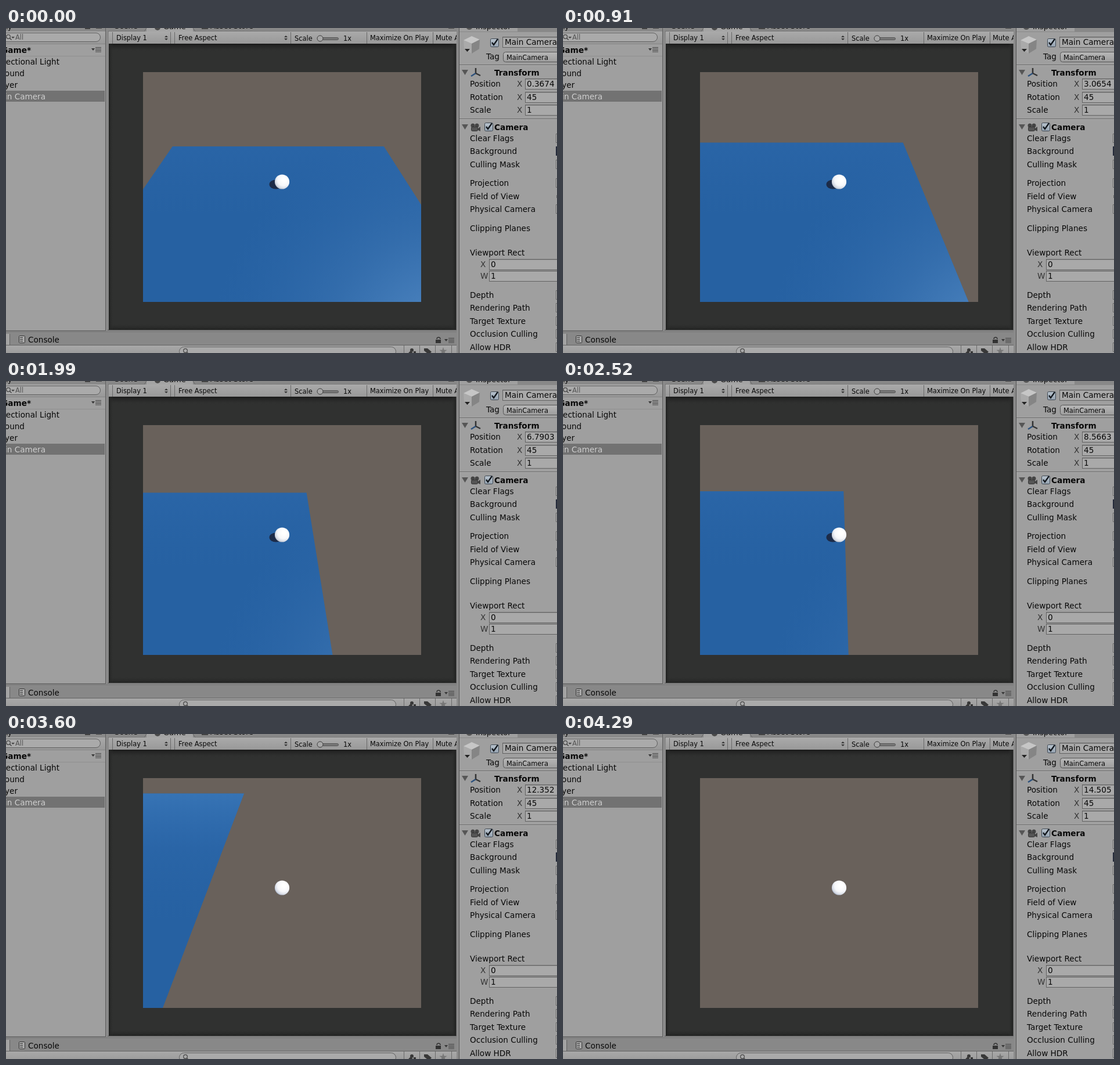
These frames come from a looping animation (949 px wide and 560 px high, 4.37 s). An HTML page with a canvas:

```html
<!DOCTYPE html>
<html lang="en">
<head>
<meta charset="utf-8">
<title>Rolling ball in the editor</title>
<style>
html, body { margin: 0; width: 100%; height: 100%; overflow: hidden; background: #9f9f9f; }
canvas { display: block; }
</style>
</head>
<body>
<canvas id="stage" width="949" height="560"></canvas>
<script>
const g = document.getElementById('stage').getContext('2d');
const LOOP = 4370, FPS = 13;
const FONT = '"DejaVu Sans", sans-serif';
const VIEW = { x: 236, y: 76, w: 479, h: 396 };
const MID = 475.5, HORIZON = -70;

// [step, value] pairs
const CAMERA_X = [[0, .367], [12, 3.8], [20, 5.9], [33, 9.55], [40, 11.37], [47, 13.24], [56, 15.6]];
const LABEL_X = [[0, .3674], [12, 3.0654], [20, 5.2681], [33, 8.5663], [40, 10.721], [47, 12.352], [56, 14.505]];
const FAR_Z = [[0, 1.511], [12, 1.572], [20, 1.601], [33, 1.646], [56, 1.726]];

function lerpKeys(keys, n) {
  let i = 1;
  while (i < keys.length - 1 && keys[i][0] < n) i++;
  const [a, va] = keys[i - 1], [b, vb] = keys[i];
  return va + (vb - va) * (n - a) / (b - a);
}

function box(x, y, w, h, fill) {
  g.fillStyle = fill;
  g.fillRect(x, y, w, h);
}

function grad(y0, y1, ...stops) {
  const s = g.createLinearGradient(0, y0, 0, y1);
  stops.forEach((c, i) => s.addColorStop(i / (stops.length - 1), c));
  return s;
}

function text(str, x, y, size = 13.6, { align = 'left', bold = false, color = '#080808' } = {}) {
  g.font = (bold ? 'bold ' : '') + size + 'px ' + FONT;
  g.textAlign = align;
  g.fillStyle = color;
  g.fillText(str, x, y);
}

function poly(points, fill) {
  g.beginPath();
  for (const [x, y] of points) g.lineTo(x, y);
  g.closePath();
  g.fillStyle = fill;
  g.fill();
}

function ellipse(x, y, rx, ry, fill) {
  g.beginPath();
  g.ellipse(x, y, rx, ry, 0, 0, 7);
  g.fillStyle = fill;
  g.fill();
}

function pill(x, y, w, h, r, fill, line) {
  g.beginPath();
  g.roundRect(x + .5, y + .5, w - 1, h - 1, r);
  g.fillStyle = fill;
  g.fill();
  g.strokeStyle = line;
  g.lineWidth = 1;
  g.stroke();
}

function stroke(points, color, width = 1) {
  g.beginPath();
  for (const [x, y] of points) g.lineTo(x, y);
  g.strokeStyle = color;
  g.lineWidth = width;
  g.stroke();
}

function lens(x, y) {
  g.beginPath();
  g.arc(x, y, 3.3, 0, 7);
  g.strokeStyle = '#444';
  g.lineWidth = 1.2;
  g.stroke();
  stroke([[x + 2.4, y + 2.4], [x + 5.5, y + 5.5]], '#444', 1.4);
}

function menuIcon(x, y) {
  poly([[x, y - 2], [x + 6, y - 2], [x + 3, y + 2]], '#383838');
  for (let i = 0; i < 4; i++) box(x + 7, y - 4 + i * 2.5, 10, 1, '#444');
}

function upDown(x, y) {
  poly([[x - 3, y - 1], [x + 3, y - 1], [x, y - 4]], '#333');
  poly([[x - 3, y + 1], [x + 3, y + 1], [x, y + 4]], '#333');
}

function field(x, y, value) {
  box(x, y, 949 - x, 19, '#626262');
  box(x + 1, y + 1, 948 - x, 17, '#a9a9a9');
  box(x + 1, y + 1, 948 - x, 1, '#8e8e8e');
  text(value, x + 3, y + 14);
}

function check(x, y) {
  pill(x, y, 15, 15, 2, grad(y, y + 15, '#b9c4ce', '#93a1af'), '#3d4650');
  stroke([[x + 3, y + 7], [x + 6, y + 11], [x + 13, y + 1]], '#10151b', 2.3);
}

function foldout(x, y) {
  poly([[x, y], [x + 11, y], [x + 5.5, y + 9]], '#565656');
}

function leftPanel() {
  box(0, 0, 172, 521, '#9f9f9f');
  box(0, 0, 172, 6, '#8a8a8a');
  box(0, 6, 172, 21, grad(6, 27, '#a9a9a9', '#989898'));
  box(0, 27, 172, 1, '#858585');
  text('Hierarchy', 10, 2, 11.4, { align: 'right' });
  box(136, 0, 9, 2, '#444');
  box(155, 0, 10, 1, '#444');
  pill(-14, 8, 177, 16, 8, '#aaaaaa', '#5f5f5f');
  lens(4, 15);
  poly([[9, 15], [15, 15], [12, 18]], '#444');
  text('All', 16, 20, 11.4, { color: '#555' });
  text('Game*', 43, 43, 13.6, { align: 'right', bold: true });
  menuIcon(147, 37);
  box(0, 48, 171, 1, '#8f8f8f');
  box(0, 108, 170, 19, '#727272');
  text('Directional Light', 92, 63, 13.6, { align: 'right' });
  text('Ground', 32, 83, 13.6, { align: 'right' });
  text('Player', 20, 103, 13.6, { align: 'right' });
  text('Main Camera', 68, 123, 13.6, { align: 'right', color: '#cfcfcf' });
  box(171, 0, 1, 522, '#5e5e5e');
  box(172, 0, 5, 524, '#8a8a8a');
  box(0, 521, 172, 1, '#5e5e5e');
}

function gamePanel() {
  g.save();
  g.beginPath();
  g.rect(176, 0, 600, 524);
  g.clip();
  box(176, 0, 600, 524, '#888');
  box(242, 0, 80, 6, '#a4a4a4');
  stroke([[242, 0], [238, 6], [176, 6]], '#666');
  stroke([[322, 0], [326, 6], [776, 6]], '#666');
  text('Scene', 187, 1, 13);
  ellipse(261, -1, 5, 5, '#4a4a4a');
  text('Game', 271, 2, 13);
  box(337, 0, 11, 2, '#444');
  text('Asset Store', 352, 1, 13);
  box(762, 0, 10, 1, '#444');
  box(177, 6, 599, 22, grad(6, 28, '#aaa', '#989898'));
  for (const x of [183, 283, 290, 490, 621, 735]) box(x, 7, 1, 20, '#686868');
  text('Display 1', 190, 21, 11.4);
  upDown(276, 17);
  text('Free Aspect', 297, 21, 11.4);
  upDown(482, 17);
  text('Scale', 497, 22, 11.4);
  pill(538, 16, 35, 5, 2, '#777', '#555');
  g.beginPath();
  g.arc(541, 18, 5, 0, 7);
  g.fillStyle = '#a8a8a8';
  g.fill();
  g.strokeStyle = '#3c3c3c';
  g.stroke();
  text('1x', 581, 22, 11.4);
  text('Maximize On Play', 627, 21, 11.4);
  text('Mute Audio', 740, 21, 11.4);
  g.restore();

  box(177, 27, 599, 493, '#303130');
  box(177, 27, 599, 14, grad(27, 41, '#1a1a1a', 'rgba(48,49,48,0)'));
  box(177, 508, 599, 12, grad(508, 520, 'rgba(48,49,48,0)', '#222322'));
  for (const [x, d] of [[177, 1], [775, -1]]) {
    const s = g.createLinearGradient(x, 0, x + d * 8, 0);
    s.addColorStop(0, '#1f201f');
    s.addColorStop(1, 'rgba(48,49,48,0)');
    box(d > 0 ? x : x - 8, 27, 8, 493, s);
  }
  box(175, 520, 602, 1, '#5c5c5c');
  box(775, 27, 1, 493, '#555');
}

function consolePanel() {
  box(0, 522, 780, 38, '#888');
  box(0, 523, 778, 1, '#777');
  box(0, 527, 6, 20, '#a3a3a3');
  box(6, 527, 1, 19, '#5f5f5f');
  box(0, 546, 778, 1, '#636363');
  box(0, 547, 778, 13, grad(547, 566, '#a8a8a8', '#999'));
  pill(22, 530, 11, 13, 1, '#aaa', '#333');
  for (let y = 533; y < 541; y += 3) box(24, y, 5, 1, '#333');
  text('Console', 38, 542);
  box(740, 537, 9, 6, '#333');
  g.beginPath();
  g.arc(745, 536, 3, Math.PI, 0);
  g.strokeStyle = '#333';
  g.lineWidth = 1.5;
  g.stroke();
  menuIcon(755, 538);
  pill(298, 549, 374, 17, 8, '#aaa', '#5f5f5f');
  lens(309, 556);
  for (const x of [685, 712, 739, 767]) box(x, 547, 1, 13, '#6a6a6a');
  ellipse(699, 555, 3, 3, '#383838');
  poly([[693, 560], [697, 556], [701, 560]], '#383838');
  box(702, 557, 4, 3, '#383838');
  poly([[720, 552], [726, 552], [733, 558], [731, 560], [725, 560], [720, 556]], '#383838');
  const star = [];
  for (let i = 0; i < 10; i++) {
    const r = i % 2 ? 2.7 : 7, a = i * Math.PI / 5 - Math.PI / 2;
    star.push([753 + r * Math.cos(a), 557 + r * Math.sin(a)]);
  }
  poly(star, '#777');
}

function inspector(label) {
  box(776, 0, 5, 560, '#8a8a8a');
  box(780, 0, 169, 560, '#9f9f9f');
  box(780, 0, 1, 560, '#515151');
  box(881, 0, 68, 6, '#888');
  text('Inspector', 809, 2, 13);
  ellipse(798, -1, 5, 4, '#555');
  box(781, 6, 168, 1, '#8a8a8a');
  poly([[788, 21], [802, 14], [816, 20], [802, 27]], '#c6c6c6');
  poly([[788, 21], [802, 27], [802, 44], [789, 36]], '#aaa');
  poly([[816, 20], [802, 27], [802, 44], [815, 36]], '#858585');
  poly([[790, 36], [799, 36], [794.5, 41]], '#222');
  check(834, 18);
  field(855, 15, '');
  text('Main Camera', 859, 29);
  text('Tag', 850, 54, 13.6, { align: 'right' });
  pill(856, 41, 110, 18, 4, grad(41, 59, '#b7b7b7', '#9d9d9d'), '#555');
  text('MainCamera', 862, 55, 11.4);
  box(781, 63, 168, 1, '#686868');
  box(781, 64, 168, 1, '#b0b0b0');

  foldout(785, 72);
  stroke([[809, 78], [809, 69]], '#333', 2.5);
  stroke([[809, 78], [801, 83]], '#2d527d', 2.5);
  stroke([[809, 78], [817, 82]], '#333', 2.5);
  text('Transform', 841, 82, 13.6, { bold: true });
  const rows = [['Position', label], ['Rotation', '45'], ['Scale', '1']];
  rows.forEach(([name, value], i) => {
    const y = 101 + Math.round(i * 22.5);
    text(name, 799, y);
    text('X', 880, y, 13.6, { color: '#333' });
    field(894, y - 14, value);
  });
  box(781, 156, 168, 1, '#686868');
  box(781, 157, 168, 1, '#b0b0b0');

  foldout(785, 166);
  ellipse(804, 168, 3.5, 3.5, '#444');
  ellipse(811, 168, 3.5, 3.5, '#444');
  pill(801, 170, 12, 8, 2, '#555', '#333');
  poly([[813, 173], [817, 170], [817, 178], [813, 176]], '#444');
  check(824, 163);
  text('Camera', 841, 176, 13.6, { bold: true });
  const labels = [
    ['Clear Flags', 195], ['Background', 217], ['Culling Mask', 240], ['Projection', 272],
    ['Field of View', 295], ['Physical Camera', 317], ['Clipping Planes', 350], ['Viewport Rect', 392],
    ['Depth', 465], ['Rendering Path', 487], ['Target Texture', 510], ['Occlusion Culling', 532], ['Allow HDR', 555]
  ];
  for (const [name, y] of labels) text(name, 799, y);
  for (const y of [190, 235, 267, 312, 460, 482, 505, 527, 550]) {
    box(947, y - 8, 2, 16, '#666');
    box(948, y - 7, 1, 14, '#b5b5b5');
  }
  box(947, 204, 2, 16, '#252b3a');
  box(948, 288, 1, 5, '#666');
  text('X', 817, 412, 13.6, { color: '#333' });
  field(832, 398, '0');
  text('W', 817, 432, 13.6, { color: '#333' });
  field(832, 418, '1');
}

function blueShade() {
  box(VIEW.x, VIEW.y, VIEW.w, VIEW.h, '#2661a2');
  box(VIEW.x, VIEW.y, VIEW.w, 250, grad(76, 326, 'rgba(72,136,200,.62)', 'rgba(60,120,190,.16)', 'rgba(50,110,180,0)'));
  const s = g.createRadialGradient(770, 570, 30, 770, 570, 420);
  s.addColorStop(0, 'rgba(100,154,210,.78)');
  s.addColorStop(.5, 'rgba(82,136,195,.3)');
  s.addColorStop(1, 'rgba(50,110,180,0)');
  box(VIEW.x, VIEW.y, VIEW.w, VIEW.h, s);
}

function scene(n) {
  const camX = lerpKeys(CAMERA_X, n);
  const fall = Math.max(0, n - 34.4) / FPS;
  const height = 1 - .4606 * fall * fall;

  g.save();
  g.beginPath();
  g.rect(VIEW.x, VIEW.y, VIEW.w, VIEW.h);
  g.clip();
  box(VIEW.x, VIEW.y, VIEW.w, VIEW.h, '#69615b');

  if (height > 0) {
    const z = lerpKeys(FAR_Z, n) / height;
    const top = 274 - 344 * (z - 1) / (z + 1);
    const edge = (side, y) => [MID + (side - camX) * .0664 / height * (y - HORIZON), y];
    const bottom = VIEW.y + VIEW.h;
    g.save();
    g.beginPath();
    for (const p of [edge(-10, top), edge(10, top), edge(10, bottom), edge(-10, bottom)]) g.lineTo(...p);
    g.closePath();
    g.clip();
    blueShade();
    if (n < 36) ellipse(465, 269.5, 11.5, 8, '#1c2b48');
    g.restore();
  }

  const dark = fall > 0 ? '#8190ad' : '#9a9da6';
  const s = g.createRadialGradient(479, 261, 3, 478, 262, 18);
  s.addColorStop(0, '#ffffff');
  s.addColorStop(.5, '#f6f7fa');
  s.addColorStop(.78, '#d5dae4');
  s.addColorStop(1, dark);
  ellipse(475.5, 265, 12.6, 12.6, s);
  g.restore();
}

function draw(ms) {
  const t = ms % LOOP;
  const n = t < 70 ? 0 : Math.min(56, Math.floor((t + 20) * FPS / 1000));
  const x = lerpKeys(LABEL_X, n);
  leftPanel();
  gamePanel();
  consolePanel();
  inspector(x.toFixed(x < 10 ? 4 : 3));
  scene(n);
}

const start = performance.now();
function tick() {
  draw(performance.now() - start);
  requestAnimationFrame(tick);
}
tick();
</script>
</body>
</html>
```
